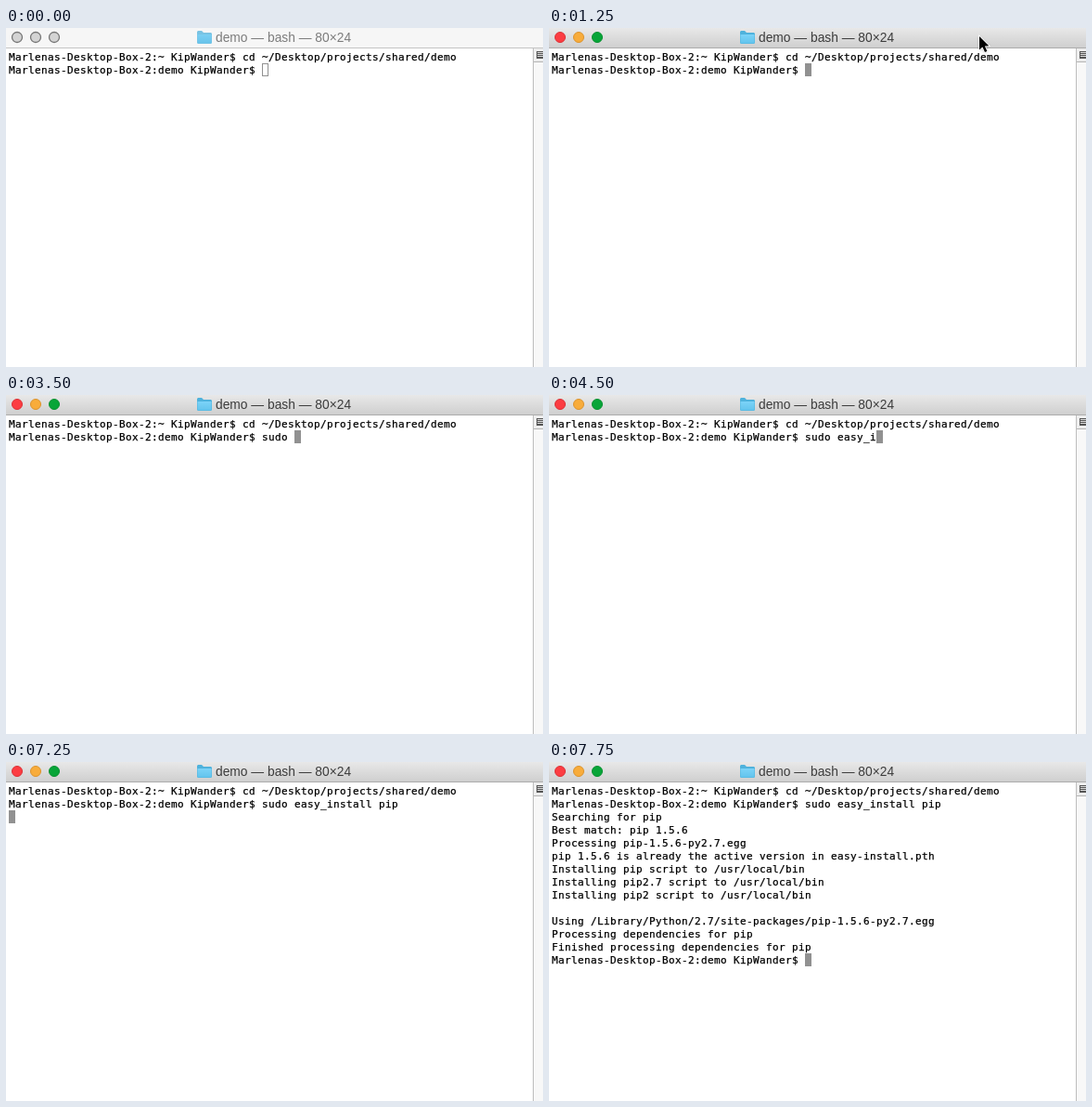
Animation, 579 px wide and 365 px high, one loop 8000 ms. Source, as an HTML page with a canvas:

```html
<!DOCTYPE html>
<html lang="en">
<head>
<meta charset="utf-8">
<title>Terminal</title>
<style>
  html, body { margin: 0; width: 579px; height: 365px; overflow: hidden; background: #fff; }
  canvas { display: block; }
</style>
</head>
<body>
<canvas id="stage" width="579" height="365"></canvas>
<script>
const ctx = document.getElementById('stage').getContext('2d');
const W = 579, H = 365, LOOP = 8000;
const CELL = 7, ROW = 14, LEFT = 3, TOP = 24;

const HOST = 'Marlenas-Desktop-Box-2', USER = 'KipWander';
const prompt = dir => `${HOST}:${dir} ${USER}$ `;
const HISTORY = prompt('~') + 'cd ~/Desktop/projects/shared/demo';
const COMMAND = 'sudo easy_install pip';
const OUTPUT = [
  'Searching for pip',
  'Best match: pip 1.5.6',
  'Processing pip-1.5.6-py2.7.egg',
  'pip 1.5.6 is already the active version in easy-install.pth',
  'Installing pip script to /usr/local/bin',
  'Installing pip2.7 script to /usr/local/bin',
  'Installing pip2 script to /usr/local/bin',
  '',
  'Using /Library/Python/2.7/site-packages/pip-1.5.6-py2.7.egg',
  'Processing dependencies for pip',
  'Finished processing dependencies for pip',
];

const ACTIVE_AT = 1250, ENTER_AT = 7250, OUTPUT_AT = 7500, DONE_AT = 7750;

// [time, characters typed so far]
const TYPING = [
  [0, 0], [3000, 2], [3250, 4], [3500, 5], [3750, 7], [4000, 9], [4250, 10],
  [4500, 11], [4750, 13], [5000, 14], [5250, 15], [5500, 17], [6000, 18],
  [6250, 20], [6500, 21],
];
// [time, tip position or null when hidden]
const POINTER = [
  [0, null], [500, [504, -8]], [750, [465, 7]], [1250, [464, 9]], [2500, null],
];

const valueAt = (steps, t) => steps.filter(([at]) => at <= t).pop()[1];

function rect(x, y, w, h, color) {
  ctx.fillStyle = color;
  ctx.fillRect(x, y, w, h);
}

function polygon(points, color) {
  ctx.beginPath();
  points.forEach(([x, y]) => ctx.lineTo(x, y));
  ctx.closePath();
  ctx.fillStyle = color;
  ctx.fill();
}

function gradient(y0, y1, from, to) {
  const g = ctx.createLinearGradient(0, y0, 0, y1);
  g.addColorStop(0, from);
  g.addColorStop(1, to);
  return g;
}

function drawButton(x, fill, line) {
  ctx.beginPath();
  ctx.arc(x, 10, 5.5, 0, Math.PI * 2);
  ctx.fillStyle = fill;
  ctx.fill();
  ctx.lineWidth = line === '#777' ? 1.3 : 1;
  ctx.strokeStyle = line;
  ctx.stroke();
}

function drawFolder(x, active) {
  ctx.globalAlpha = active ? 1 : 0.75;
  polygon([[x, 4], [x + 1, 3], [x + 5, 3], [x + 7, 5], [x + 15, 5], [x + 16, 6],
           [x + 16, 16], [x + 15, 17], [x + 1, 17], [x, 16]], '#4fb2dc');
  rect(x + 0.5, 7, 15, 9.5, gradient(7, 17, '#7bd3f8', '#62c3ec'));
  ctx.globalAlpha = 1;
}

function drawTitleBar(active, process) {
  rect(0, 0, W, 21, active ? gradient(0, 21, '#e8e8e8', '#cfcfcf') : '#f6f6f6');
  rect(0, 21, W, 1, active ? '#acacac' : '#c4c4c4');

  const lights = active
    ? [['#fc3d42', '#dc3035'], ['#f8ac3b', '#dc932c'], ['#08a538', '#07902f']]
    : Array(3).fill(['#d4d4d4', '#777']);
  lights.forEach(([fill, line], i) => drawButton(12 + 20 * i, fill, line));

  ctx.font = '13.8px "Liberation Sans", Arial, sans-serif';
  const title = `demo — ${process} — 80×24`;
  const x = Math.round(289 - (ctx.measureText(title).width + 20) / 2);
  drawFolder(x, active);
  ctx.fillStyle = active ? '#3c3c3c' : '#7c7c7c';
  ctx.fillText(title, x + 20, 15);
}

function drawScrollbar() {
  rect(568, 22, 1, H - 22, '#bdbdbd');
  rect(569, 22, 10, H - 22, '#f8f8f8');
  rect(569, 22, 10, 15, '#eeeeee');
  rect(569, 36, 10, 1, '#b4b4b4');
  rect(572, 25, 7, 8, '#555');
  for (let y = 26; y < 32; y += 2) rect(573, y, 6, 1, '#d8d8d8');
}

function drawLine(text, row) {
  ctx.font = '11px "DejaVu Sans Mono", monospace';
  ctx.fillStyle = ctx.strokeStyle = '#000';
  ctx.lineWidth = 0.25;
  [...text].forEach((ch, i) => {
    const x = LEFT + i * CELL, y = TOP + row * ROW + 11;
    ctx.fillText(ch, x, y);
    ctx.strokeText(ch, x, y);
  });
}

function drawCursor(col, row, active) {
  const x = LEFT + col * CELL, y = TOP + row * ROW;
  if (active) return rect(x, y, CELL, ROW, '#919191');
  ctx.strokeStyle = '#919191';
  ctx.lineWidth = 1;
  ctx.strokeRect(x + 0.5, y + 0.5, CELL - 1, ROW - 1);
}

function drawPointer([x, y]) {
  const arrow = [[0, 0], [0, 14.5], [3.4, 11.4], [6, 17], [8.4, 16], [5.9, 10.5], [10.3, 10.3]]
    .map(([dx, dy]) => [x + dx, y + dy]);
  ctx.save();
  ctx.shadowColor = 'rgba(0,0,0,0.35)';
  ctx.shadowBlur = 3;
  ctx.shadowOffsetY = 1;
  polygon(arrow, '#fff');
  ctx.restore();
  ctx.lineWidth = 1.6;
  ctx.strokeStyle = '#fff';
  ctx.stroke();
  polygon(arrow, '#000');
}

function draw(t) {
  const active = t >= ACTIVE_AT;
  const busy = t >= OUTPUT_AT && t < DONE_AT;
  const lines = [HISTORY, prompt('demo') + COMMAND.slice(0, valueAt(TYPING, t))];
  if (t >= OUTPUT_AT) lines.push(...OUTPUT, prompt('demo'));
  else if (t >= ENTER_AT) lines.push('');

  rect(0, 0, W, H, '#fff');
  drawTitleBar(active, busy ? 'Python' : 'bash');
  drawScrollbar();
  const last = lines.length - 1;
  drawCursor(lines[last].length, last, active);
  lines.forEach(drawLine);

  const tip = valueAt(POINTER, t);
  if (tip) drawPointer(tip);
}

const start = performance.now();
function tick() {
  draw((performance.now() - start) % LOOP);
  requestAnimationFrame(tick);
}
tick();
</script>
</body>
</html>
```
